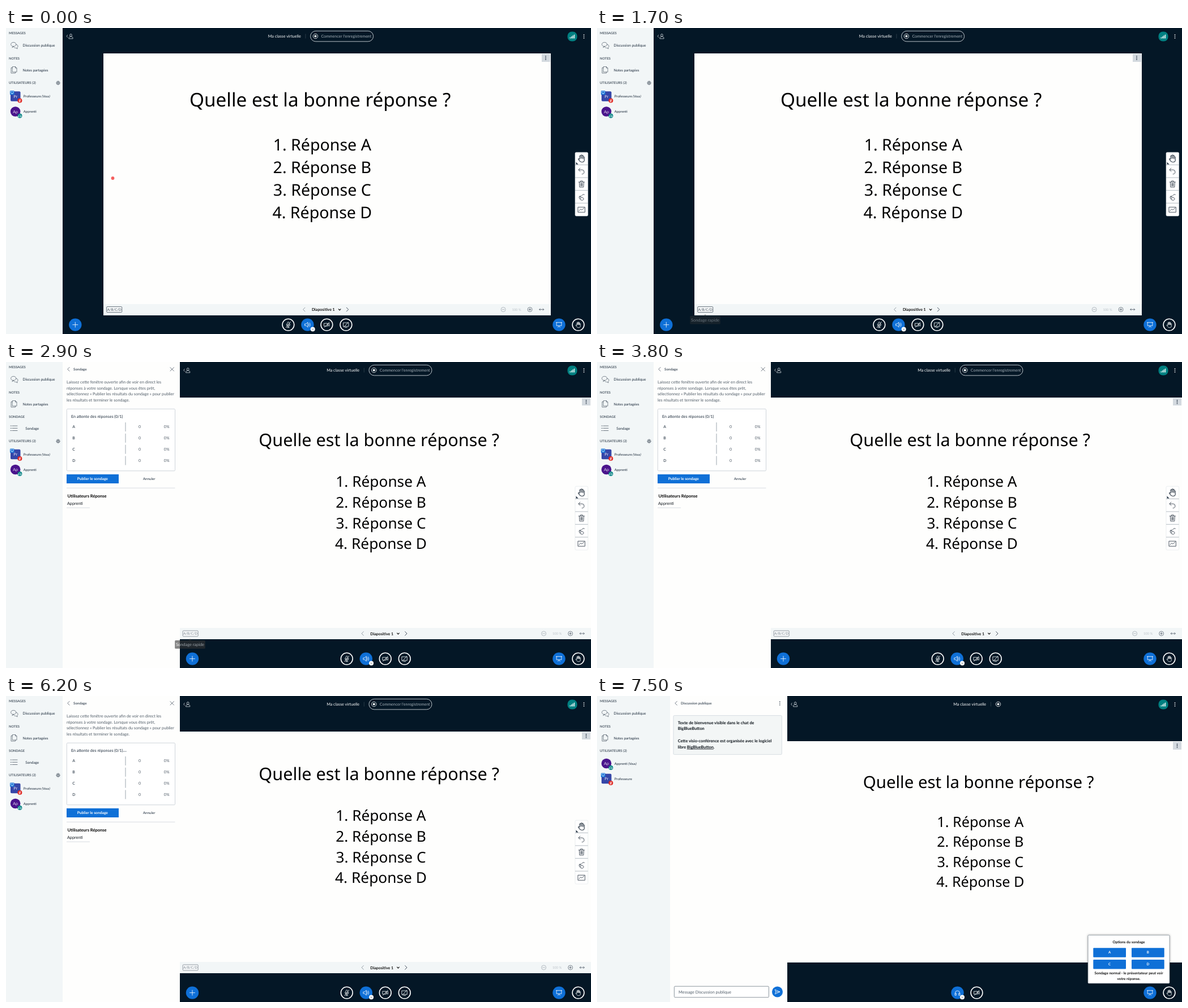
Recreate the animation shown at these times as an HTML page. Size 1033 by 542 pixels, loop 8 s.

```html
<!DOCTYPE html>
<html lang="fr">
<head>
<meta charset="utf-8">
<style>
html, body { margin: 0; height: 100%; overflow: hidden; background: #041726; }
svg { display: block; width: 1033px; height: 542px; font-family: Lato, "Noto Sans", sans-serif; text-rendering: geometricPrecision; }
.slide { font-family: "Noto Sans", "Open Sans", sans-serif; }
</style>
</head>
<body>
<svg id="stage" viewBox="0 0 1033 542"></svg>
<script>
const NAVY = '#041726', BLUE = '#0f70d7', GREEN = '#008081', RED = '#df2721', GREY = '#4e5a66', INK = '#1b2a3a', BLACK = '#0a1118', WHITE = '#fefefd';
const BOLD = ' font-weight="700"', MID = ' text-anchor="middle"', CRISP = 'shape-rendering="crispEdges"';
const TEACHER = 'Professeure', STUDENT = 'Apprenti';

// Text is placed by the vertical centre of its capitals.
const text = (s, x, y, size, fill = GREY, attrs = '') =>
  `<text x="${x}" y="${y + size * .357}" font-size="${size}" fill="${fill}"${attrs}>${s}</text>`;
const rect = (x, y, w, h, fill, attrs = CRISP) =>
  `<rect x="${x}" y="${y}" width="${w}" height="${h}" fill="${fill}" ${attrs}/>`;
const circle = (x, y, r, fill, attrs = '') => `<circle cx="${x}" cy="${y}" r="${r}" fill="${fill}" ${attrs}/>`;
const line = (x1, y1, x2, y2, stroke, w = .8) => `<path d="M${x1} ${y1}L${x2} ${y2}" stroke="${stroke}" stroke-width="${w}"/>`;
const outline = (color, w = .8) => `stroke="${color}" stroke-width="${w}"`;

const ICONS = {
  mic: 'M-1.6-3.2a1.6 1.6 0 0 1 3.2 0v3a1.6 1.6 0 0 1-3.2 0zM-3-1v1a3 3 0 0 0 6 0v-1M0 3v2M-2 5h4M4-5L-4 5',
  speaker: 'M-4.5-1.5h2l3-3v9l-3-3h-2zM2-2a3 3 0 0 1 0 4M3.5-3.5a5 5 0 0 1 0 7',
  webcam: 'M-4.5-2.5h6v5h-6zM1.5-.5l3-2v5l-3-2M4.5-4.5L-4 4.5',
  screen: 'M-4.5-3.5h9v6.5h-9zM-2 4.8h4M4-4.5L-4 4.5',
  board: 'M-5-4h10M-4.3-4v5.8h8.6v-5.8M0 1.8v1M-2 4.6l2-1.8 2 1.8',
  hand: 'M-2.6 1v-4a.8.8 0 0 1 1.6 0v3v-4a.8.8 0 0 1 1.6 0v4v-3.5a.8.8 0 0 1 1.6 0v4v-2a.8.8 0 0 1 1.6 0v3.5c0 2-1 3-2.5 3h-1.5c-1.5 0-2-1-4-3.5c-.6-1 .5-1.6 1.6-.5',
  headset: 'M-4 1.5v-1a4 4 0 0 1 8 0v1M-4 1h1.8v3.5h-1.8zM4 1h-1.8v3.5h1.8z',
  plus: 'M-4.5 0h9M0-4.5v9',
  minus: 'M-2 0h4',
  smallPlus: 'M-2 0h4M0-2v4',
  left: 'M1.6-3.4L-1.8 0L1.6 3.4',
  right: 'M-1.6-3.4L1.8 0L-1.6 3.4',
  down: 'M-1.8-1L0 1L1.8-1',
  close: 'M-3.2-3.2L3.2 3.2M3.2-3.2L-3.2 3.2',
  fit: 'M-4 0h8M-2.4-1.6L-4 0l1.6 1.6M2.4-1.6L4 0l-1.6 1.6',
  undo: 'M-2.4-5.5l-3 3l3 3M-5.2-2.5h6a3.8 3.8 0 0 1 0 7.6',
  trash: 'M-5-3.5h10M-1.8-3.8v-1.7h3.6v1.7M-4-3.5l.5 9h7l.5-9M-1.5-1.5v5M0-1.5v5M1.5-1.5v5',
  draw: 'M-5 1c2-3 3-1 5-3s3-3 5-2M-4 2.5c1.5 2.5 3 3.5 5 3.5c2.5 0 3-2 2.5-3.5c-1-1-2-1.5-4-1l-1.5-2.5c-1-1-2 0-1.5 1l2 4',
  chart: 'M-6-4.5h12v9h-12zM-4.5 2l3-3l2 1.5l4-3.5',
  bubbles: 'M-1.5 1.5c-3.5 0-4.8-1.5-4.8-3.5c0-2.2 1.8-3.6 4.5-3.6s4.5 1.4 4.5 3.6c0 2-1.6 3.5-4.2 3.5l-2.5 1.8zM3-1.7c2 .2 3 1.3 3 3c0 1.3-.6 2-1.4 2.6l.5 2l-2.4-1.5c-2 .2-3.2-.4-3.8-1.6',
  notes: 'M-2.5-6h5l2.5 2.5v7h-7.5zM2.5-6v2.5h2.5M-2.5-4h-2.5v9.5h7.5v-2',
  list: 'M-6-4.2h1.5M-3-4.2h9M-6 0h1.5M-3 0h9M-6 4.2h1.5M-3 4.2h9',
  person: 'M-4.8-2L-6.2 0l1.4 2M1.2-3.8a2 2 0 1 1 0 4a2 2 0 0 1 0-4M-2.4 4c0-2.4 1.2-3.2 2.2-3.2h2.8c1 0 2.2.8 2.2 3.2z',
  gear: 'M0-3.6V-2.6M0 3.6V2.6M-3.6 0h1M3.6 0h-1M-2.6-2.6l.8.8M2.6 2.6l-.8-.8M-2.6 2.6l.8-.8M2.6-2.6l-.8.8M0-2.5a2.5 2.5 0 1 1 0 5a2.5 2.5 0 0 1 0-5M0-1.1a1.1 1.1 0 1 1 0 2.2a1.1 1.1 0 0 1 0-2.2',
  send: 'M-4-3.8L4.5 0L-4 3.8L-2.8 0zM-2.8 0h7',
};
const icon = (name, x, y, color = GREY, w = .8, scale = 1) =>
  `<path transform="translate(${x} ${y}) scale(${scale})" d="${ICONS[name]}" fill="none" stroke="${color}" stroke-width="${w}" stroke-linejoin="round" stroke-linecap="round"/>`;
const kebab = (x, y, color) => [-2.8, 0, 2.8].map(d => circle(x, y + d, .85, color)).join('');

const roundButton = (name, x, filled = true) =>
  circle(x, 525.6, filled ? 11.2 : 10.4, filled ? BLUE : NAVY, filled ? '' : outline('#fff', 1.6)) + icon(name, x, 525.6, '#fff');
const chevronBadge = x => circle(x, 533.5, 4, '#fff') + icon('down', x, 533.6, NAVY, .8, .7);

const slide = (x, y, w) => rect(x, y, w, w * 9 / 16, WHITE) +
  `<g class="slide" transform="translate(${x} ${y}) scale(${w / 789.5})">` +
  text('Quelle est la bonne réponse ?', 382.7, 82.2, 33.3, '#000', MID) +
  ['A', 'B', 'C', 'D'].map((c, i) => text(`${i + 1}. Réponse ${c}`, 386.3, 162 + i * 40, 28.55, '#000', MID)).join('') + '</g>' +
  rect(x + w - 16, y + 1.2, 15, 13.6, '#d3d9df') + kebab(x + w - 8.5, y + 8.2, INK);

const header = left => rect(left, 0, 1033 - left, 542, NAVY) + icon('person', left + 13.5, 14.5, '#d5dbe0', .8) +
  rect(991.5, 6.5, 17, 17, GREEN, 'rx="7.5"') +
  [0, 1, 2, 3].map(i => rect(995.6 + i * 2.4, 16.5 - i * 1.6, 1.4, 2 + i * 1.6, '#fff', '')).join('') + kebab(1020.5, 15, '#fff') +
  roundButton('board', 976.5) + roundButton('hand', 1010.5, false);

const recordDot = x => circle(x, 14.5, 4.2, 'none', outline('#fff')) + circle(x, 14.5, 2, '#fff');

function sidebar(width, usersY, users, gear) {
  return rect(0, 0, width, 542, '#f2f6f7') +
    text('MESSAGES', 5, 9, 5.8, GREY, BOLD) + icon('bubbles', 15, 31, GREY, .7) + text('Discussion publique', 29.5, 30.5, 6.5, INK) +
    text('NOTES', 5, 54, 5.8, GREY, BOLD) + icon('notes', 14, 74.5, GREY, .7) + text('Notes partagées', 29.5, 74.8, 6.3, INK) +
    text('UTILISATEURS (2)', 5, usersY, 5.9, GREY, BOLD) + (gear ? icon('gear', 92, usersY + .3, GREY, .8) : '') + users;
}
const you = '<tspan font-style="italic" font-size="5.8"> (Vous)</tspan>';
const userLabel = (name, y, self) => text(name + (self ? you : ''), 30.8, y, 6, INK);
const teacher = (y, self) => rect(8, y - 8.7, 17.5, 17.5, '#3546a8', 'rx="2"') + text('Pr', 16.7, y + .3, 7.2, '#e2e5f5', MID) +
  rect(7, y - 10, 7.6, 7.2, BLUE, 'rx="1.2"') + icon('board', 10.8, y - 6.4, '#fff', 1, .55) +
  circle(24.4, y + 7.5, 4, RED) + icon('mic', 24.4, y + 7.5, '#fff', 1.2, .45) + userLabel(TEACHER, y, self);
const student = (y, self) => circle(16.6, y, 8.8, '#4a148c') + text('Ap', 16.6, y + .3, 7, '#e8e0f2', MID) +
  circle(24.4, y + 7.6, 4, GREEN) + icon('headset', 24.4, y + 7.4, '#fff', 1.2, .5) + userLabel(STUDENT, y, self);

function palette() {
  const tools = ['hand', 'undo', 'trash', 'draw', 'chart'];
  return rect(1005, 220.2, 22.6, 112.8, '#fff', 'rx="2" ' + outline('#dde2e6', .6)) +
    tools.map((name, i) => icon(name, 1016.3, 231 + i * 22.7, '#3a4652', .9, i ? 1 : 1.3) +
      (i ? line(1005, 219.8 + i * 22.6, 1027.6, 219.8 + i * 22.6, '#a3acb4') : '')).join('') +
    '<path d="M1006.5 237.5v4h4z" fill="#1b2a3a"/>';
}

// Presenter's meeting area, right of `left`, with the slide and its toolbar.
function presenterArea(left, x, y, w, buttonInk) {
  const mid = (left + 1033) / 2, right = x + w, bar = y + w * 9 / 16, cy = bar + 9.8;
  return header(left) +
    text('Ma classe virtuelle', mid - 103.6, 14.2, 7.2, '#fff') + line(mid - 37.5, 10.5, mid - 37.5, 18.5, '#3c4b58', .7) +
    rect(mid - 28.8, 5.3, 111, 18.6, NAVY, 'rx="9.3" ' + outline('#cfd5da', .9)) + recordDot(mid - 20) +
    text("Commencer l'enregistrement", mid - 10, 14.4, 7.05, '#a9b3bb') +
    slide(x, y, w) + rect(x, bar, w, 19.8, '#f2f6f7') +
    rect(x + 5.7, cy - 5, 27, 10, '#f7f9fa', 'rx="1.2" ' + outline(buttonInk, .8)) + text('A/B/C/D', x + 19.2, cy, 6.1, buttonInk, MID) +
    icon('left', mid - 40, cy, '#7d8791') + text('Diapositive 1', mid - 26.5, cy + .2, 6.95, '#111', BOLD) +
    icon('down', mid + 22.7, cy + .2, '#111', 1.2) + icon('right', mid + 36.5, cy, INK) +
    circle(right - 83.4, cy, 4, 'none', outline('#98a1a9', .7)) + icon('minus', right - 83.4, cy, '#98a1a9', .7) +
    text('100 %', right - 60, cy + .2, 5.8, '#bcc3c9', MID) +
    circle(right - 36.4, cy, 4, 'none', outline(GREY, .7)) + icon('smallPlus', right - 36.4, cy, GREY, .8) +
    icon('fit', right - 15.8, cy, GREY, .8) +
    roundButton('plus', left + 22.5) + roundButton('mic', mid - 68, false) + roundButton('speaker', mid - 34) + chevronBadge(mid - 24.7) +
    roundButton('webcam', mid, false) + roundButton('screen', mid + 34, false) + palette();
}

function pollPanel() {
  const intro = ['Laissez cette fenêtre ouverte afin de voir en direct les', 'réponses à votre sondage. Lorsque vous êtes prêt,',
    'sélectionnez « Publier les résultats du sondage » pour publier', 'les résultats et terminer le sondage.'];
  return rect(99.5, 0, 207, 542, WHITE) + icon('left', 110.5, 12.8) + text('Sondage', 119, 12.8, 6.2, GREY, BOLD) + icon('close', 293.2, 12.8) +
    intro.map((s, i) => text(s, 107, 35.2 + i * 10.8, 7.18)).join('') +
    rect(107.3, 83.2, 191.2, 109.6, '#fff', 'rx="1.5" ' + outline('#c3cbd2', .8)) +
    text('En attente des réponses (0/1)', 115, 96.2, 7.1, INK) +
    ['A', 'B', 'C', 'D'].map((c, i) => {
      const y = 115 + i * 19.85;
      return text(c, 117.2, y, 6.8, GREY, BOLD) + line(211, y - 8, 211, y + 8, '#9aa4ad', 1) +
        text('0', 236, y, 7, GREY, MID) + text('0%', 288.5, y, 7, GREY, ' text-anchor="end"');
    }).join('') +
    rect(107, 199, 91.5, 16, BLUE) + text('Publier le sondage', 152.8, 207, 6.7, '#fff', BOLD + MID) +
    text('Annuler', 252.7, 207, 6.2, INK, MID) + line(107, 223.2, 298.5, 223.2, '#cfd5da', .8) +
    text('Utilisateurs Réponse', 108.5, 237.8, 7.55, '#000', BOLD) + text(STUDENT, 108, 250, 7.2, BLACK) + line(107, 258.2, 148, 258.2, '#cfd5da', .8);
}

function chatPanel() {
  const bold = (s, y) => text(s, 142.8, y, 7.28, BLACK, BOLD);
  return rect(128.5, 0, 207, 542, WHITE) + icon('left', 139.7, 12.8) + text('Discussion publique', 148, 12.8, 6.15, GREY, BOLD) + kebab(322.8, 13, GREY) +
    rect(135, 34.6, 191.3, 69, '#f3f6f6', 'rx="1.5" ' + outline('#cfd6dc', .8)) +
    bold('Texte de bienvenue visible dans le chat de', 47) + bold('BigBlueButton', 57.7) +
    bold('Cette visio-conférence est organisée avec le logiciel', 79.3) +
    bold('libre <tspan text-decoration="underline">BigBlueButton</tspan>.', 90.2) +
    rect(136.4, 514.2, 167, 19.6, '#fff', 'rx="1.5" ' + outline('#7f8a94', .9)) + text('Message Discussion publique', 144, 524, 7.25, GREY) +
    circle(318.5, 524, 9.5, BLUE) + icon('send', 318.5, 524, '#fff');
}

function pollPopup() {
  const choice = (c, x, y) => rect(x, y, 57.7, 16.6, BLUE, 'rx="1"') + text(c, x + 28.8, y + 8, 6.2, '#fff', BOLD + MID);
  const caption = (s, y) => text(s, 939, y, 6.4, '#111', BOLD + MID);
  return rect(867, 423.6, 144, 85.4, '#000', 'filter="url(#shadow)"') + rect(867, 423.6, 144, 85.4, '#fff', 'rx="1.5" ' + outline('#8a949e', .8)) +
    caption('Options du sondage', 436) + choice('A', 876.3, 446.2) + choice('B', 944, 446.2) + choice('C', 876.3, 467) + choice('D', 944, 467) +
    caption('Sondage normal - le présentateur peut voir', 491.2) + caption('votre réponse.', 500.6);
}

const lecture = presenterArea(99.8, 172, 44.7, 789.5, '#43505c') + sidebar(99.8, 97, teacher(121, true) + student(148), true);
const poll = presenterArea(306.5, 306.5, 62.5, 726.5, '#7a858f') + pollPanel() +
  sidebar(99.8, 140, text('SONDAGE', 5, 96.5, 5.8, GREY, BOLD) + icon('list', 14, 117.3, GREY, .8) + text('Sondage', 34.2, 117.3, 6.4, INK) +
    teacher(163.5, true) + student(190.5), true);
const answer = header(335.5) + text('Ma classe virtuelle', 629.2, 14.2, 7.2, '#fff') + line(695.5, 10.5, 695.5, 18.5, '#3c4b58', .7) + recordDot(708.5) +
  slide(335.5, 80, 697.5) + roundButton('headset', 636.5) + chevronBadge(645) + roundButton('webcam', 670.5, false) +
  pollPopup() + chatPanel() + sidebar(128.5, 96.7, student(119.5, true) + teacher(146.5));

const $ = id => document.getElementById(id);
$('stage').innerHTML = `<defs>
  <filter id="shadow" x="-20%" y="-20%" width="140%" height="140%"><feGaussianBlur in="SourceAlpha" stdDeviation="2"/><feComponentTransfer><feFuncA type="linear" slope=".4"/></feComponentTransfer></filter></defs>
  <g id="lecture">${lecture}${circle(0, 0, 2.9, '#f4605f', 'id="pointer"')}</g>
  <g id="poll">${poll}${[0, 1, 2].map(i => circle(207.5 + i * 2.2, 98.1, .6, INK, 'class="dot"')).join('')}</g>
  <g id="answer">${answer}</g>
  <g id="tip">${rect(-26.8, -7.3, 53.6, 14.6, '#333', 'rx="1.5"')}<path d="M-3-7.2l3-3l3 3z" fill="#333"/>${text('Sondage rapide', 0, 0, 7.4, '#fff', MID)}</g>`;

const dots = document.querySelectorAll('.dot');
const path = [[0, 188.5, 266], [200, 187.3, 275], [400, 185, 300], [500, 184.3, 325], [600, 184.2, 350], [800, 185, 385], [1000, 187.5, 416], [1200, 193.5, 463]];
const show = (el, on) => el.style.display = on ? '' : 'none';
const clamp = v => Math.max(0, Math.min(1, v));

function render() {
  const t = Math.floor(performance.now() % 8000 / 100) * 100;
  const polling = t >= 2900 && t < 7500;
  show($('lecture'), t < 2900);
  show($('poll'), polling);
  show($('answer'), t >= 7500);

  const [, x, y] = path.filter(p => p[0] <= t).pop();
  show($('pointer'), t < 1300);
  $('pointer').setAttribute('transform', `translate(${x} ${y})`);

  const count = Math.floor((t - 2824) / 225) % 4;
  dots.forEach((dot, i) => show(dot, i < count));

  const shown = polling ? clamp((3300 - t) / 400) * .6 : t < 2900 ? clamp((t - 1500) / 500) : 0;
  $('tip').setAttribute('opacity', shown);
  $('tip').setAttribute('transform', `translate(${polling ? 325 : 191} ${(polling ? 502.4 : 520.2) - 5 * (1 - shown)})`);
  requestAnimationFrame(render);
}
render();
</script>
</body>
</html>
```
